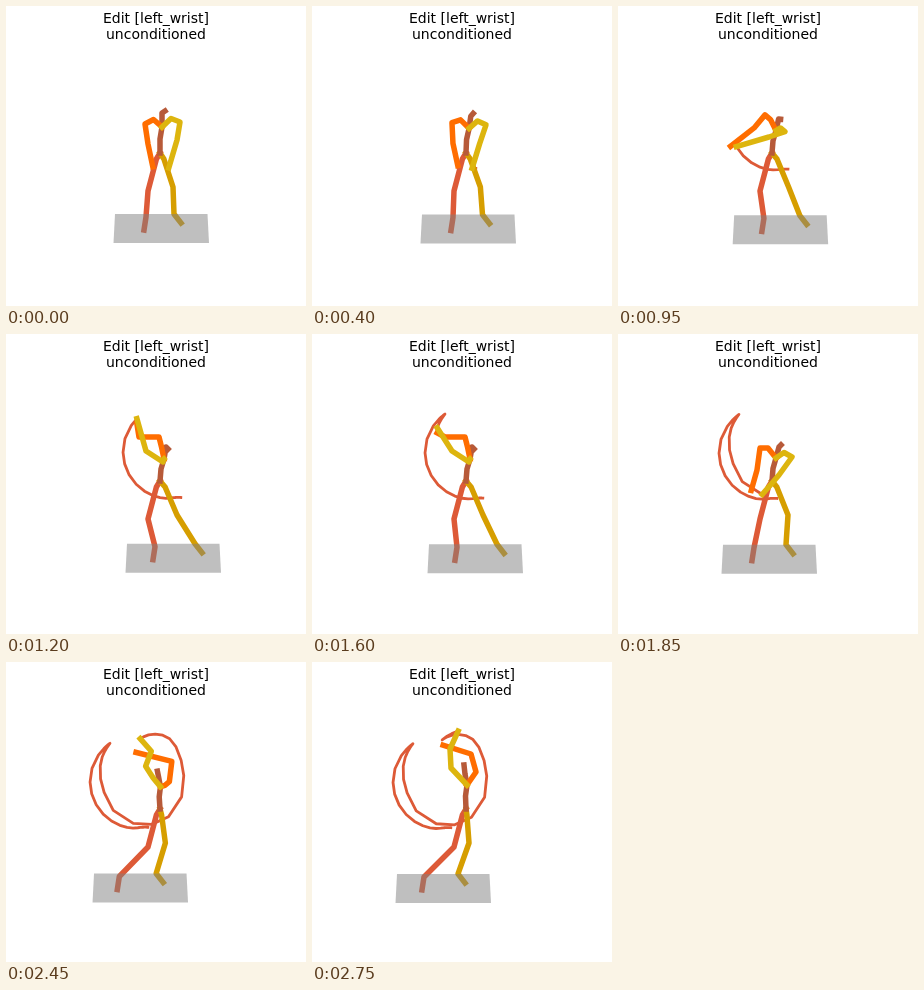
These frames come from a looping animation (300x300 px, 2.8 s). An HTML page:

```html
<!DOCTYPE html>
<html>
<head>
<meta charset="utf-8">
<style>
  html, body { margin: 0; width: 100%; height: 100%; overflow: hidden; background: #fff; }
  svg { display: block; width: 100vw; height: 100vh; }
  text { font: 14px "DejaVu Sans", sans-serif; text-anchor: middle; }
  polyline { fill: none; stroke-width: 5.5; stroke-linejoin: round; stroke-linecap: square; }
</style>
</head>
<body>
<svg viewBox="0 0 300 300">
  <text x="150" y="17">Edit [left_wrist]</text>
  <text x="150" y="33">unconditioned</text>
  <g id="figure"></g>
  <polygon id="floor" points="0,0 92.5,0 94,29 -1.5,29" fill="#808080" fill-opacity=".5"/>
</svg>
<script>
const LOOP = 2800, STEP = 50;

// The swing moves through five poses, returning to the address between two backswings
const STAND = 0, ADDRESS = 1, TOP = 2, FOLLOW = 3, FINISH = 4;
const poseTimes = [0, 750, 1200, 1600, 1850, 2200, 2750];
const sequence = [STAND, ADDRESS, TOP, TOP, ADDRESS, FOLLOW, FINISH];

// Monotone cubic interpolation through (times, values)
function curve(times, values) {
  const last = times.length - 1;
  const slope = times.slice(1).map((t, i) => (values[i + 1] - values[i]) / (t - times[i]));
  const tangent = times.map((_, i) => {
    const a = slope[i - 1], b = slope[i];
    return a * b > 0 ? 2 * a * b / (a + b) : 0;
  });
  return t => {
    if (t >= times[last]) return values[last];
    let i = 0;
    while (t >= times[i + 1]) i++;
    const h = times[i + 1] - times[i], u = (t - times[i]) / h, v = 1 - u;
    return values[i] * v * v * (1 + 2 * u) + values[i + 1] * u * u * (3 - 2 * u)
      + h * u * v * (tangent[i] * v - tangent[i + 1] * u);
  };
}

// One value per pose
const blend = (...values) => curve(poseTimes, sequence.map(pose => values[pose]));
const joint = (...points) => {
  const x = blend(...points.map(p => p[0])), y = blend(...points.map(p => p[1]));
  return t => [x(t), y(t)];
};
const add = ([ax, ay], [bx, by], k = 1) => [ax + k * bx, ay + k * by];
const middle = (a, b) => add(a, add(b, a, -1), 0.5);

const floorX = curve(poseTimes, [109, 112, 121, 117, 105, 93, 85]);
const floorAt = t => [floorX(t), 208 + t / 700];

// The left wrist circles a fixed point over the floor: time, degrees clockwise from below, radius
const swing = [
  [0, -13, 48], [600, -4, 47], [750, 12, 48], [1050, 88, 47], [1200, 134, 46],
  [1400, 144, 46], [1600, 124, 42], [1750, 70, 35], [1850, 5, 43], [1950, -41, 48],
  [2050, -96, 47], [2200, -142, 53], [2500, -177, 41], [2750, -160, 53]
];
const swingTimes = swing.map(k => k[0]);
const angle = curve(swingTimes, swing.map(k => k[1] * Math.PI / 180));
const radius = curve(swingTimes, swing.map(k => k[2]));
const wristPath = t => add([43, -93], [-Math.sin(angle(t)), Math.cos(angle(t))], radius(t));

const pelvis = [154, 147];
const chest = joint([156, 121], [158, 124], [158, 125], [154, 126], [155, 123]);
const neck = joint([156, 107], [161, 113], [160, 113], [152, 116], [153, 112]);
const head = joint([159, 105], [163, 111], [162, 115], [151, 114], [152, 103]);
const collarLift = blend(6, 5, 1, -2, 0);

const leftShoulder = joint([174, 116], [174, 123], [157, 128], [141, 103], [139, 106]);
const leftElbow = joint([171, 134], [161, 141], [140, 117], [154, 94], [138, 87]);
const rightShoulder = joint([139, 118], [142, 114], [153, 103], [162, 127], [164, 110]);
const rightElbow = joint([142, 138], [139, 136], [133, 103], [171, 111], [159, 92]);
const handGap = joint([-16, -1], [-11, -4], [0, 5], [4, 13], [-15, 14]);

const leftKnee = blend(13, 16, 17, 9, 3);
const leftAnkle = blend(59, 63, 68, 63, 61);
const rightAnkle = blend(31, 31, 28, 24, 27);

function leg(knee, ankle, foot) {
  const hip = [knee[0] * 0.3, 6];
  return [pelvis, add(pelvis, hip), add(pelvis, knee), ankle, add(ankle, foot)];
}

function arm(t, shoulder, elbow, wrist) {
  const collar = add(middle(chest(t), shoulder(t)), [0, -collarLift(t)]);
  return [chest(t), collar, shoulder(t), elbow(t), wrist];
}

// Limbs from back to front
function pose(t) {
  const floor = floorAt(t);
  const wrist = add(floor, wristPath(t));
  const spineBend = add(middle(pelvis, chest(t)), [-1, -1]);
  return [
    leg([-12, 38], add(floor, [rightAnkle(t), 3]), [-2, 13]),
    leg([leftKnee(t), 34], add(floor, [leftAnkle(t), 0]), [7, 9]),
    [pelvis, spineBend, chest(t), neck(t), head(t)],
    arm(t, rightShoulder, rightElbow, add(wrist, handGap(t))),
    arm(t, leftShoulder, leftElbow, wrist)
  ];
}

function addLine(color) {
  const line = document.createElementNS("http://www.w3.org/2000/svg", "polyline");
  line.style.stroke = color;
  return document.getElementById("figure").appendChild(line);
}

const floor = document.getElementById("floor");
const trail = addLine("#dd5a37");
trail.style.strokeWidth = 2.8;
const limbs = ["#dd5a37", "#d69e00", "#b75a39", "#ff6d00", "#ddb50e"].map(addLine);

function draw(now) {
  const t = Math.floor(now % LOOP / STEP) * STEP;
  const offset = `translate(${floorAt(t)})`;
  floor.setAttribute("transform", offset);
  trail.setAttribute("transform", offset);

  const past = Array.from({ length: t / STEP + 1 }, (_, i) => wristPath(i * STEP));
  trail.setAttribute("points", past.join(" "));
  pose(t).forEach((points, i) => limbs[i].setAttribute("points", points.join(" ")));
}

const start = performance.now();
function tick() {
  draw(performance.now() - start);
  requestAnimationFrame(tick);
}
tick();
</script>
</body>
</html>
```
